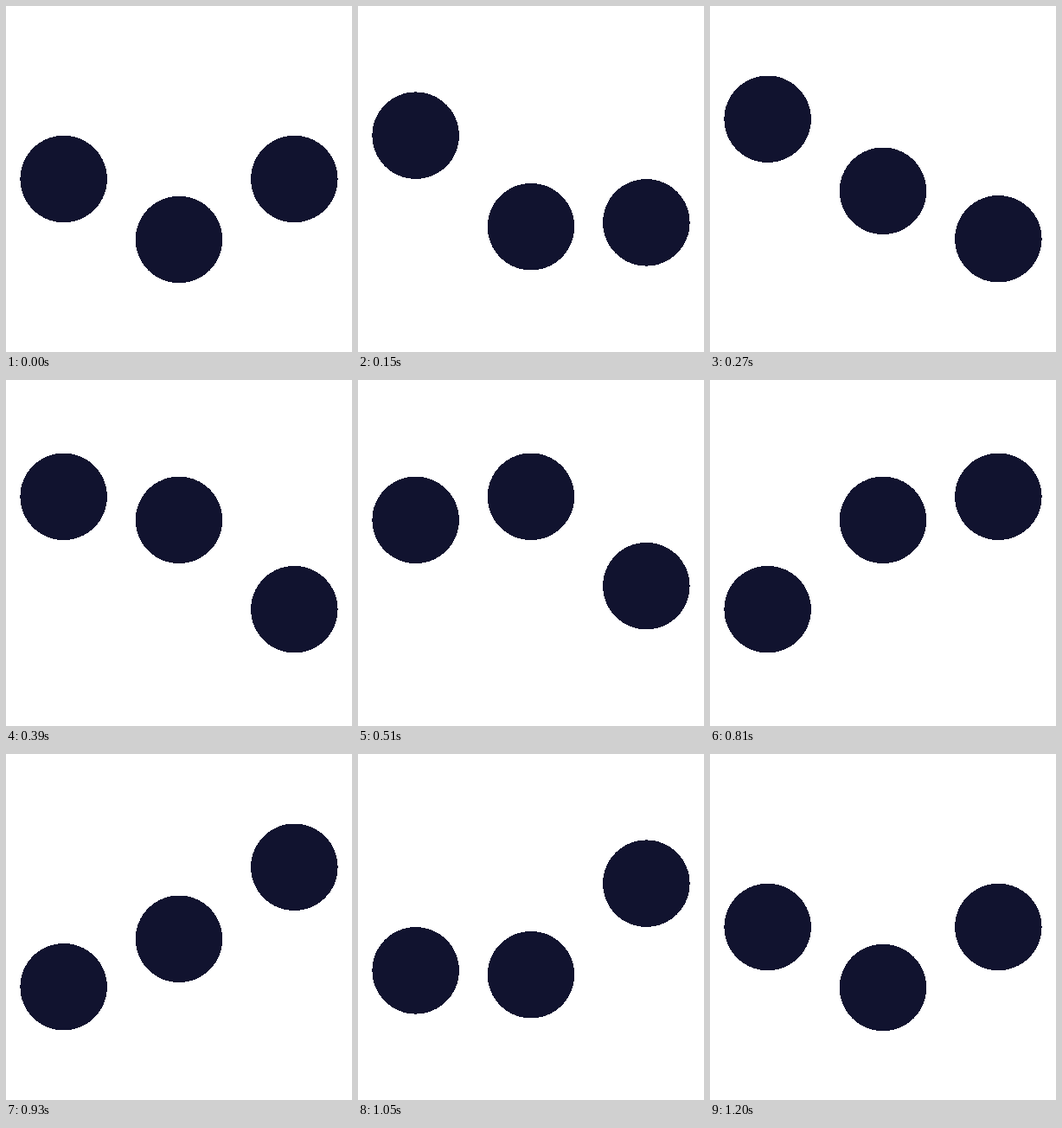
An HTML page that plays this animation: 400x400 px, repeating every 1.23 s.

```html
<!DOCTYPE html>
<html lang="en">
<head>
<meta charset="utf-8">
<title>Three bouncing dots</title>
<style>
  html, body { margin: 0; width: 100%; height: 100%; overflow: hidden; background: #fff; }
  svg { display: block; width: 100%; height: 100%; }
  circle { fill: #11132f; shape-rendering: crispEdges; }
</style>
</head>
<body>
<svg viewBox="0 0 400 400">
  <circle id="left" cx="66.67" cy="200" r="50.25"/>
  <circle id="mid" cx="200" cy="270" r="50.25"/>
  <circle id="right" cx="333.33" cy="200" r="50.25"/>
</svg>
<script>
  const LOOP = 1230, STEP = 30, MID = 200, TOP = 130, LOW = 270;

  // Cubic Bézier easing, solved for x by bisection
  function bezier(x1, y1, x2, y2) {
    const at = (a, b, s) => 3 * (1 - s) ** 2 * s * a + 3 * (1 - s) * s * s * b + s ** 3;
    return x => {
      let lo = 0, hi = 1;
      for (let i = 0; i < 30; i++) {
        const s = (lo + hi) / 2;
        if (at(x1, x2, s) < x) lo = s; else hi = s;
      }
      return at(y1, y2, (lo + hi) / 2);
    };
  }

  const swing = bezier(0.5, 0, 0.5, 1);
  const leave = bezier(0.167, 0.167, 0.5, 1);
  const settle = bezier(0.5, 0, 0.833, 0.833);

  // Each key: start time, end time, from, to, easing
  const side = [
    [0, 300, MID, TOP, leave],
    [300, 900, TOP, LOW, swing],
    [900, 1200, LOW, MID, settle]
  ];
  const middle = [
    [0, 600, LOW, TOP, swing],
    [600, 1200, TOP, LOW, swing]
  ];

  function track(keys, t) {
    const [t0, t1, from, to, ease] = keys.find(k => t <= k[1]);
    return from + (to - from) * ease((t - t0) / (t1 - t0));
  }

  const place = (id, y) => document.getElementById(id).setAttribute('cy', y.toFixed(3));

  function draw() {
    // The motion advances in 30 ms steps; the half millisecond absorbs timer rounding
    const t = Math.floor(((performance.now() + 0.5) % LOOP) / STEP) * STEP;
    const y = track(side, t);
    place('left', y);
    place('mid', track(middle, t));
    place('right', 2 * MID - y);
    requestAnimationFrame(draw);
  }
  draw();
</script>
</body>
</html>
```
